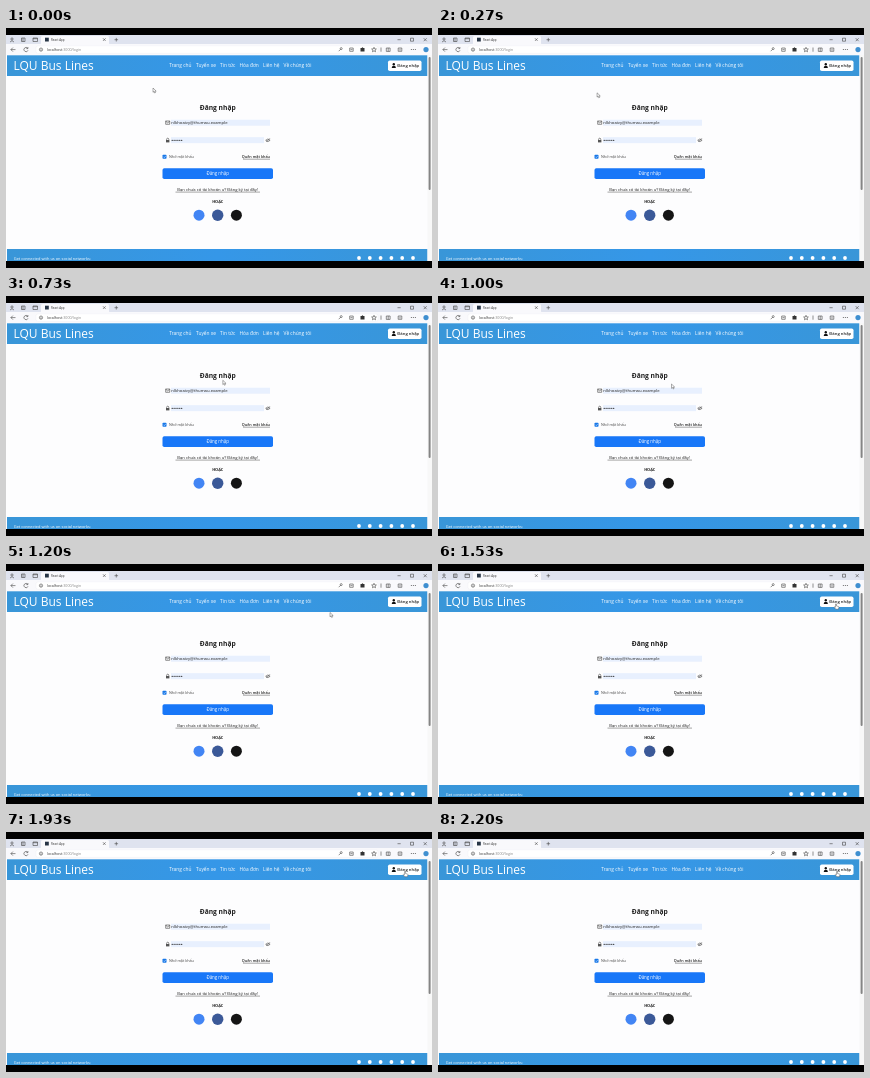
An HTML page for the animation above (2.27 s loop, 426 by 240 pixels).

```html
<!DOCTYPE html>
<html lang="vi">
<head>
<meta charset="utf-8">
<title>React App</title>
<style>
html, body { margin: 0; width: 100%; height: 100%; overflow: hidden; background: #000; }
svg { display: block; width: 100vw; height: 100vh; font-family: "Open Sans", "Noto Sans", sans-serif; }
.mid { text-anchor: middle; }
.bold { font-weight: 700; }
.semi { font-weight: 600; }
.line { fill: none; stroke: #444; stroke-width: .6; }
.under { stroke: #222; stroke-width: .4; }
</style>
</head>
<body>
<svg viewBox="0 0 426 240" preserveAspectRatio="none">
  <defs>
    <linearGradient id="bar">
      <stop offset="0" stop-color="#3996d8"/>
      <stop offset=".5" stop-color="#3597e8"/>
      <stop offset="1" stop-color="#3996d8"/>
    </linearGradient>
    <clipPath id="win"><rect y="7" width="426" height="226"/></clipPath>
  </defs>
  <rect width="426" height="240"/>
  <g clip-path="url(#win)">
    <rect y="7" width="426" height="226" fill="#fdfdfe"/>

    <!-- browser chrome -->
    <rect y="7" width="426" height="9.5" fill="#dfe3ef"/>
    <path d="M34 16.5q1 0 1-1.500V9.500q0-1.500 1.500-1.500H101.500q1.500 0 1.500 1.500V15q0 1.500 1 1.500z" fill="#f9f9fc"/>
    <rect y="16" width="426" height="11" fill="#f9f9fc"/>
    <rect x="30" y="17.800" width="342" height="7.600" rx="2" fill="#fff" stroke="#e8e8ee" stroke-width=".3"/>
    <circle cx="6" cy="11" r="1.100" class="line"/>
    <path class="line" d="M4 14q2-2.600 4 0M15.500 10h3.500v3.500h-3.500zM17 10v3.500M27 10h4.500v3.500h-4.500zM27 10.700h4.500M97 10.300l2.600 2.600m0-2.600l-2.600 2.600M108.500 11.700h3.600m-1.800-1.800v3.600M391.500 11.700h3.200M404.500 10.200h3v3h-3zM417.700 10.200l3 3m0-3l-3 3"/>
    <rect x="39" y="9.700" width="3.800" height="3.800" fill="#263445"/>
    <text x="45" y="12.900" font-size="2.9" fill="#333">React App</text>
    <path class="line" d="M9.500 21.600h-4.600m2-2l-2 2l2 2M21.700 20.300a2.100 2.100 0 1 0 .3 2M21.900 19v1.600h-1.600"/>
    <circle cx="35" cy="21.600" r="1.600" class="line"/>
    <path class="line" d="M35 21.200v1.400"/>
    <text x="41" y="22.900" font-size="3.65" fill="#333">localhost<tspan fill="#888">:3000/login</tspan></text>
    <path class="line" d="M332.700 23.200l2-2M343.700 20h3.500v3.300h-3.500zM344.500 21.600h2M375 19.500v4.200M380.300 20h3.800v3.400h-3.800zM382.200 20v3.400M392.200 20h3.600v3.300h-3.600zM394 20.700v2"/>
    <circle cx="335.200" cy="20.600" r="1" class="line"/>
    <path d="M354.500 20h1.200q.8-1.300 1.600 0h1.200v3.600h-4z" fill="#333"/>
    <path class="line" d="M368 19.300l.7 1.600l1.700.1l-1.300 1.100l.4 1.700l-1.500-1l-1.500 1l.4-1.700l-1.300-1.100l1.700-.1z"/>
    <g fill="#444"><circle cx="405.300" cy="21.600" r=".5"/><circle cx="407.300" cy="21.600" r=".5"/><circle cx="409.300" cy="21.600" r=".5"/></g>
    <circle cx="420" cy="21.600" r="2.600" fill="#3f8fd0"/>

    <!-- site header -->
    <rect x="1" y="27.300" width="420.500" height="20.700" fill="url(#bar)"/>
    <text x="7.500" y="41.800" font-size="12" fill="#fff">LQU Bus Lines</text>
    <g id="nav" font-size="4.85" fill="#fff"></g>
    <rect x="382" y="32.500" width="33.500" height="10.500" rx="1.800" fill="#fff"/>
    <circle cx="387.800" cy="36.200" r="1.200" fill="#111"/>
    <path d="M385.700 40q0-2.300 2.100-2.300t2.100 2.300z" fill="#111"/>
    <text x="391.300" y="39.400" font-size="4.2" class="semi" fill="#222">Đăng nhập</text>

    <!-- sign-in form -->
    <text x="211.700" y="81.600" font-size="6.7" class="mid bold" fill="#222">Đăng nhập</text>
    <rect x="165" y="91.700" width="99" height="6" fill="#e8f0fe"/>
    <path class="line" d="M159.700 93h4v3.300h-4zM159.700 93.200l2 1.700l2-1.700"/>
    <text x="165.300" y="96.300" font-size="4.25" fill="#222">nlkhoaivy@thumau.example</text>
    <rect x="165" y="109.200" width="93" height="6" fill="#e8f0fe"/>
    <path class="line" d="M160.600 112v-.6q0-1.200 1.100-1.200t1.100 1.200v.6"/>
    <rect x="160" y="112" width="3.400" height="2.400" fill="#555"/>
    <g id="dots" fill="#222"></g>
    <path class="line" d="M259.700 112.300q2.200-2.700 4.400 0q-2.200 2.700-4.400 0M260.300 114l3.500-3.600"/>
    <rect x="156.500" y="126.700" width="4" height="4" rx=".8" fill="#1677e8"/>
    <path d="M157.400 128.700l.9.900l1.500-1.700" fill="none" stroke="#fff" stroke-width=".5"/>
    <text x="163" y="130.200" font-size="3.75" fill="#444">Nhớ mật khẩu</text>
    <text x="264" y="130.200" font-size="3.75" text-anchor="end" class="semi" fill="#222">Quên mật khẩu</text>
    <path class="under" d="M237 131.200H264"/>
    <rect x="156.500" y="140.200" width="110.500" height="10.800" rx="1.800" fill="#1877f8"/>
    <text x="211.700" y="147.200" font-size="4.4" class="mid" fill="#fff">Đăng nhập</text>
    <text x="211.700" y="163" font-size="4.2" class="mid" fill="#222">Bạn chưa có tài khoản ư? Đăng ký tại đây!</text>
    <path class="under" d="M169.500 164.100H254"/>
    <text x="211.700" y="174.800" font-size="3.9" class="mid bold" fill="#222">HOẶC</text>
    <circle cx="193" cy="187.200" r="5.500" fill="#4285f4"/>
    <circle cx="211.700" cy="187.200" r="5.700" fill="#3b5998"/>
    <circle cx="230.400" cy="187.200" r="5.500" fill="#151515"/>

    <!-- footer and scrollbar -->
    <rect x="1" y="221" width="420.500" height="12" fill="url(#bar)"/>
    <text x="7.800" y="232" font-size="3.95" fill="#fff">Get connected with us on social networks:</text>
    <g id="social" fill="#fff"></g>
    <rect x="421.500" y="27" width="4.500" height="206" fill="#f8f8f8"/>
    <rect x="422.600" y="29" width="2" height="133" rx="1" fill="#858585"/>

    <g id="pointer">
      <path id="arrow" d="M0 0v4.300l1-.9l.7 1.600l.8-.4l-.7-1.500h1.400z" fill="#fff" stroke="#333" stroke-width=".4"/>
      <path id="beam" d="M-1 -2.500H1M0 -2.500V2.500M-1 2.500H1" fill="none" stroke="#333" stroke-width=".5"/>
      <path id="hand" d="M-.5 0q.5-.6 1 0v2l2 .5q.6.300.4 1l-.5 1.700h-2.600l-1.700-2q.3-.8 1.400 0z" fill="#fff" stroke="#333" stroke-width=".4"/>
    </g>
  </g>
</svg>
<script>
const $ = id => document.getElementById(id);
const add = (parent, tag, attrs, text = "") => {
  const el = document.createElementNS("http://www.w3.org/2000/svg", tag);
  for (const k in attrs) el.setAttribute(k, attrs[k]);
  el.textContent = text;
  $(parent).append(el);
};

[["Trang chủ", 163.3], ["Tuyến xe", 190], ["Tin tức", 214], ["Hóa đơn", 233.5],
 ["Liên hệ", 257], ["Về chúng tôi", 277.5]]
  .forEach(([label, x]) => add("nav", "text", { x, y: 39.2 }, label));
for (let i = 0; i < 6; i++) {
  add("dots", "circle", { cx: 166.2 + i * 1.9, cy: 112.3, r: .65 });
  add("social", "circle", { cx: 353 + i * 10.8, cy: 230, r: 1.9 });
}

// Pointer path: time, x, y
const LOOP = 2270, STEP = 1000 / 15;
const path = [
  [0, 147, 60], [200, 150, 62], [530, 195, 76], [800, 224, 87],
  [1000, 233.5, 88], [1070, 250, 80], [1200, 324, 48.5],
  [1330, 374, 42], [1470, 397, 40], [1530, 398, 40], [1930, 399, 39.5], [LOOP, 399, 39.5]
];

function place(t) {
  const i = path.findIndex(p => p[0] > t);
  const [t0, x0, y0] = path[i - 1], [t1, x1, y1] = path[i];
  const u = (t - t0) / (t1 - t0);
  return [x0 + (x1 - x0) * u, y0 + (y1 - y0) * u];
}

function draw(now) {
  const t = now % LOOP;
  const tick = Math.min(33, Math.floor((t + 5) / STEP));
  const [x, y] = place(tick * STEP);
  const onTitle = x > 193 && x < 231 && y > 74 && y < 84;
  const onButton = x > 382 && y > 32 && y < 43;
  const kind = onButton ? "hand" : onTitle ? "beam" : "arrow";
  for (const id of ["arrow", "beam", "hand"]) $(id).style.display = id === kind ? "" : "none";
  $("pointer").setAttribute("transform", `translate(${x} ${y})`);
}

const start = performance.now();
function loop() {
  draw(performance.now() - start);
  requestAnimationFrame(loop);
}
loop();
</script>
</body>
</html>
```
